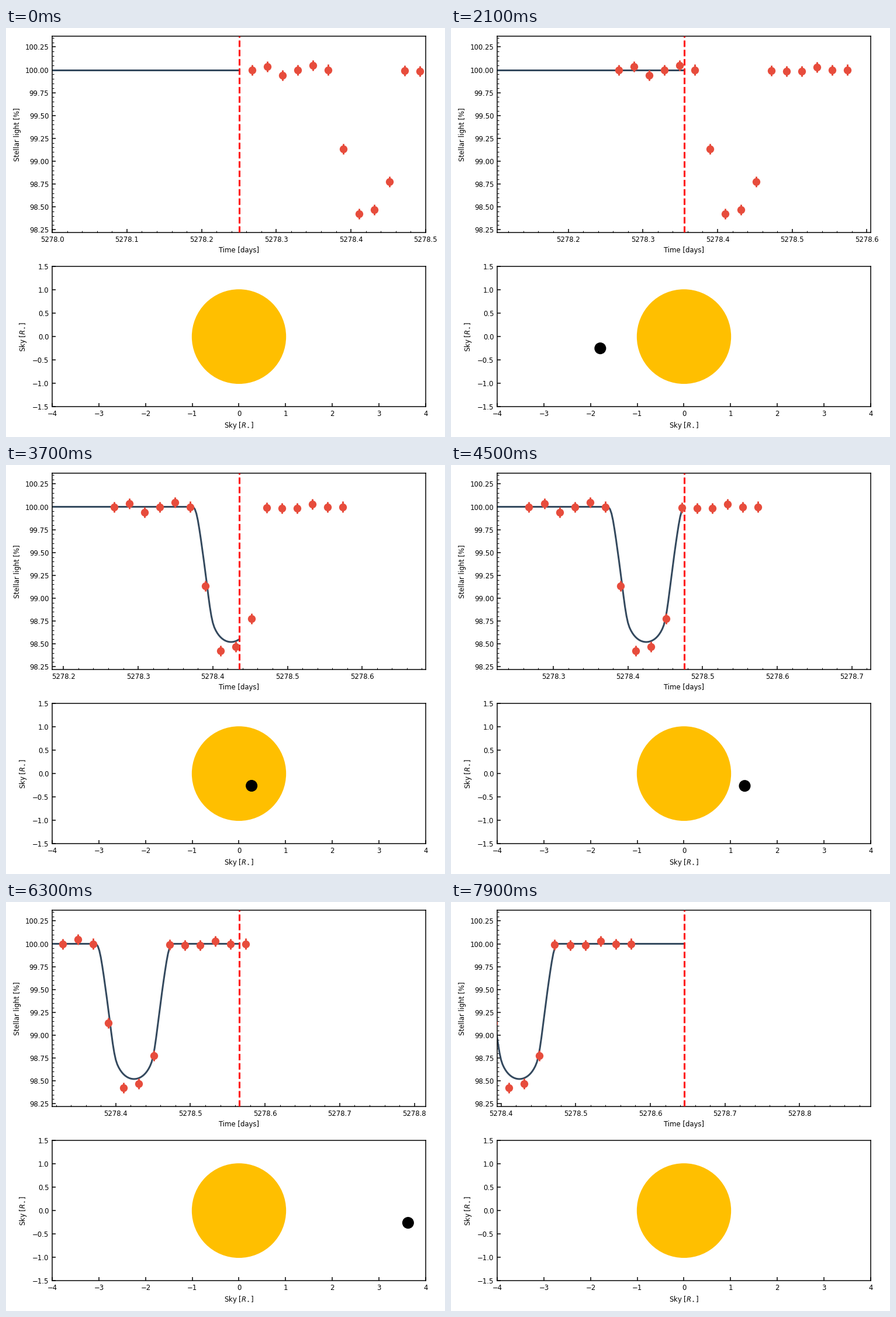
Recreate the animation shown at these times as a matplotlib script. Size 751 by 700 pixels, loop 8000 ms.

```python
import numpy as np
import matplotlib.pyplot as plt
from matplotlib.animation import FuncAnimation
from matplotlib.ticker import AutoMinorLocator, MultipleLocator

W, H, DPI = 751, 700, 120
FRAMES, INTERVAL = 80, 100
START, STEP, HALF_SPAN = 5278.25, 0.005, 0.25
MID_TRANSIT, SPEED = 5278.4245, 25.8      # days, stellar radii per day
PLANET_R, DEPTH, CADENCE = 0.115, 1.48, 0.02044
LIMB = (0.4, 0.25)
LINE = 1.8

plt.rcParams.update({
    "font.family": "DejaVu Sans", "font.size": 7,
    "axes.labelsize": 7, "xtick.labelsize": 7, "ytick.labelsize": 7,
    "xtick.direction": "in", "ytick.direction": "in",
    "axes.linewidth": 0.9, "xtick.major.width": 0.9, "ytick.major.width": 0.9,
})


def planet_position(time):
    x = (time - MID_TRANSIT) * SPEED
    return x, -0.2595 - 0.0034 * x + 0.0008 * x**2


def light_curve(times):
    """Limb-darkened transit averaged over one exposure, in percent."""
    k = np.arange(240) + 0.5
    radius, angle = PLANET_R * np.sqrt(k / 240), k * np.pi * (3 - 5**0.5)
    exposure = np.linspace(-0.5, 0.5, 41) * CADENCE
    x, y = planet_position(times[:, None] + exposure)
    r2 = ((x[..., None] + radius * np.cos(angle))**2
          + (y[..., None] + radius * np.sin(angle))**2)
    dim = 1 - np.sqrt(np.clip(1 - r2, 0, 1))
    blocked = np.where(r2 < 1, 1 - LIMB[0] * dim - LIMB[1] * dim**2, 0)
    loss = blocked.mean(axis=(1, 2))
    return 100 - DEPTH * loss / loss.max()


def add_axes(top, bottom, left=79.2, right=717.8):
    return fig.add_axes([left / W, 1 - bottom / H,
                         (right - left) / W, (bottom - top) / H])


fig = plt.figure(figsize=(W / DPI, H / DPI), dpi=DPI, facecolor="white")

light = add_axes(13.7, 350.3)
light.set_ylim(98.217, 100.37)
light.set_xlabel("Time [days]", labelpad=3)
light.set_ylabel("Stellar light [%]")
light.xaxis.set_major_locator(MultipleLocator(0.1))
light.yaxis.set_major_locator(MultipleLocator(0.25))
light.xaxis.set_minor_locator(AutoMinorLocator(5))
light.yaxis.set_minor_locator(AutoMinorLocator(5))
light.xaxis.set_major_formatter("{x:.1f}")
light.yaxis.set_major_formatter("{x:.2f}")

flux = np.array([99.995, 100.035, 99.94, 99.995, 100.047, 100.0, 99.132, 98.422,
                 98.468, 98.775, 99.99, 99.985, 99.985, 100.03, 99.995, 100.0])
observed = 5278.2675 + CADENCE * np.arange(len(flux))
light.errorbar(observed, flux, yerr=0.058, fmt="o", ms=7, color="#e74c3c",
               elinewidth=LINE, zorder=4)

model_times = 5277.99 + 0.002 * np.arange(335)
model_flux = light_curve(model_times)
model, = light.plot([], [], color="#34495e", lw=LINE, zorder=2)
now = light.axvline(START, color="red", ls="--", lw=LINE, zorder=3)

sky = add_axes(408, 648.3)
sky.set(xlim=(-4, 4), ylim=(-1.5, 1.5))
sky.set_xlabel(r"Sky [$R_\star$]", labelpad=2.9)
sky.set_ylabel(r"Sky [$R_\star$]", labelpad=4.3)
sky.yaxis.set_major_locator(MultipleLocator(0.5))
sky.add_patch(plt.Circle((0, 0), 1, color="#ffbf00"))
planet = sky.add_patch(plt.Circle((-9, 0), PLANET_R, color="black", zorder=2))


def draw(frame):
    time = START + STEP * frame
    light.set_xlim(time - HALF_SPAN, time + HALF_SPAN)
    past = model_times < time - 1e-6
    model.set_data(model_times[past], model_flux[past])
    now.set_xdata([time, time])
    planet.center = planet_position(time)
    return model, now, planet


anim = FuncAnimation(fig, draw, frames=FRAMES, interval=INTERVAL,
                     repeat=True, repeat_delay=0, blit=False)
plt.show()
```
